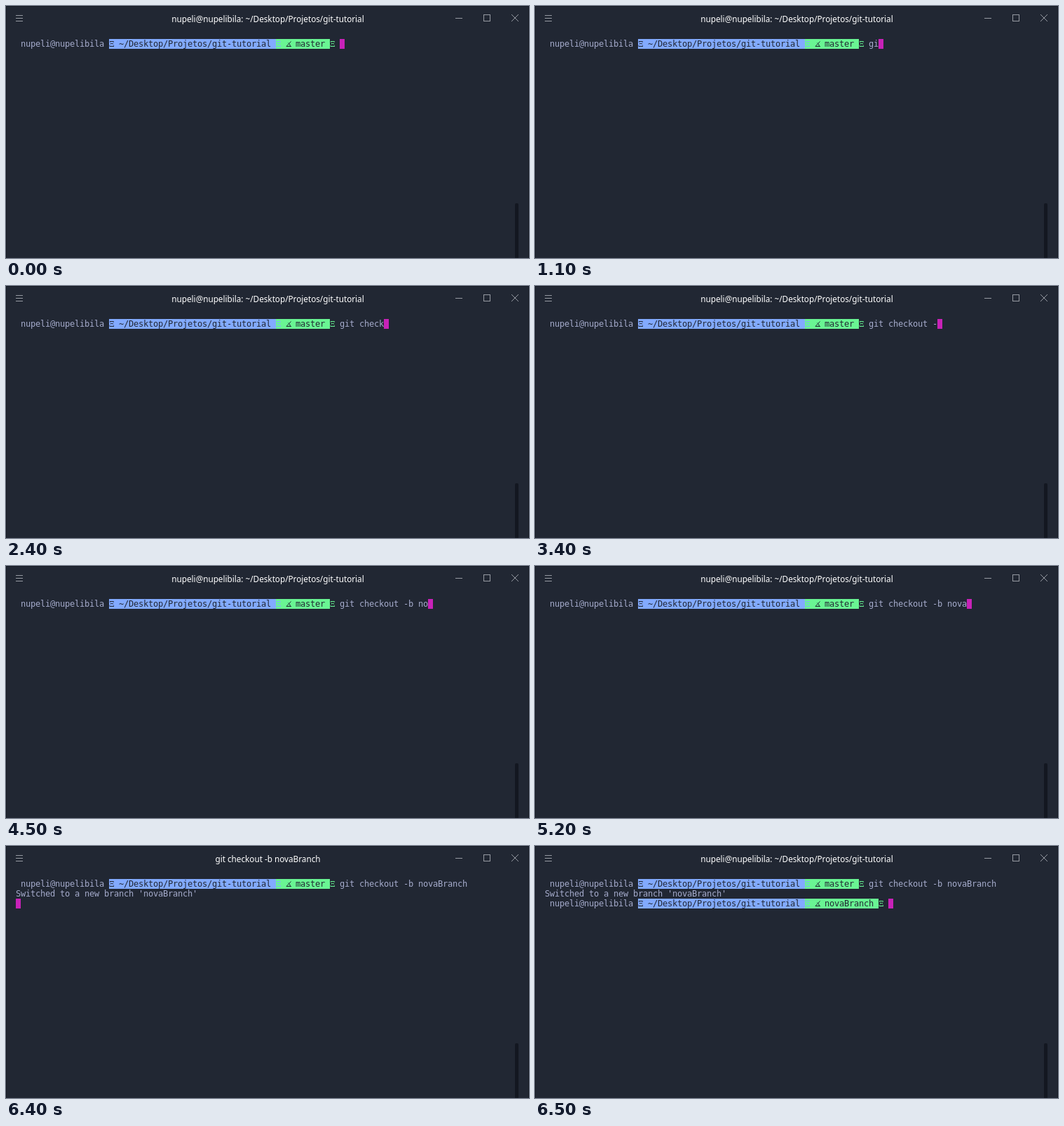
An HTML page with a canvas for the animation above (8 s loop, 746 by 359 pixels).

```html
<!DOCTYPE html>
<html lang="pt">
<head>
<meta charset="utf-8">
<title>Terminal</title>
<style>
  html, body { margin: 0; width: 100%; height: 100%; overflow: hidden; background: #212733; }
  canvas { display: block; }
</style>
</head>
<body>
<canvas id="stage" width="746" height="359"></canvas>
<script>
const ctx = document.getElementById('stage').getContext('2d');
const LOOP = 8000, CELL = 7, ROW = 14, LEFT = 14, TOP = 47;
const color = {
  back: '#212733', text: '#a6accd', blue: '#82aaff', green: '#69f593',
  cursor: '#c822b8', icon: '#969aa2', edge: '#151a24', bar: '#131721'
};
const mono = '12px "DejaVu Sans Mono", monospace';
const serif = '12px "Liberation Serif", serif';
const user = 'nupeli@nupelibila';
const path = '~/Desktop/Projetos/git-tutorial';
const branch = 'novaBranch';
const command = 'git checkout -b ' + branch;
// Moment at which each character of the command appears
const keyTimes = [
  1100, 1100, 1300, 1500, 1600, 1800, 2000, 2300, 2400, 2700, 2900, 3000, 3100,
  3400, 4000, 4100, 4400, 4500, 5000, 5200, 5400, 5600, 5800, 5900, 6000, 6200
];
const outputTime = 6400, promptTime = 6500;

const cellX = col => LEFT + col * CELL;
const cellY = row => TOP + row * ROW;

function rect(x, y, w, h, fill) {
  ctx.fillStyle = fill;
  ctx.fillRect(x, y, w, h);
}

// Writes text on the terminal grid and returns the next free column
function write(text, col, row, fill = color.text, back) {
  if (back) rect(cellX(col), cellY(row), text.length * CELL, ROW, back);
  ctx.textAlign = 'left';
  ctx.fillStyle = fill;
  [...text].forEach((char, i) => {
    ctx.font = char === 'Ξ' ? serif : mono;
    ctx.fillText(char, cellX(col + i), cellY(row) + 11);
  });
  return col + text.length;
}

function branchIcon(col, row) {
  const x = cellX(col), y = cellY(row);
  ctx.strokeStyle = color.back;
  ctx.lineWidth = 1;
  ctx.beginPath();
  ctx.moveTo(x + 8, y + 10.5);
  ctx.lineTo(x + 1, y + 10.5);
  ctx.lineTo(x + 7.5, y + 3.5);
  ctx.moveTo(x + 3.5, y + 5.5);
  ctx.quadraticCurveTo(x + 6.5, y + 7, x + 6.5, y + 11);
  ctx.stroke();
}

function prompt(row, name) {
  const pathCol = write(user + ' ', 1, row);
  const branchCol = write(`Ξ ${path} `, pathCol, row, color.back, color.blue);
  const end = write(`    ${name} `, branchCol, row, color.back, color.green);
  write('Ξ', branchCol, row, color.blue);
  branchIcon(branchCol + 2, row);
  return write('Ξ ', end, row, color.green);
}

function cursor(col, row) {
  rect(cellX(col), cellY(row), CELL, ROW, color.cursor);
}

function windowFrame(title) {
  rect(0, 0, 746, 359, color.back);
  rect(0, 0, 746, 1, color.edge);
  rect(0, 0, 1, 359, color.edge);
  rect(745, 0, 1, 359, color.edge);

  ctx.font = '11.73px "Noto Sans", sans-serif';
  ctx.textAlign = 'center';
  ctx.fillStyle = '#fff';
  ctx.fillText(title, 373.5, 23);

  for (const y of [13, 17, 21]) rect(14, y, 10, 1, color.icon);
  rect(641, 17, 10, 1, color.icon);
  ctx.strokeStyle = color.icon;
  ctx.lineWidth = 1;
  ctx.strokeRect(681.5, 12.5, 9, 9);
  ctx.beginPath();
  ctx.moveTo(721, 12);
  ctx.lineTo(731, 22);
  ctx.moveTo(731, 12);
  ctx.lineTo(721, 22);
  ctx.stroke();

  ctx.fillStyle = color.bar;
  ctx.beginPath();
  ctx.roundRect(726, 281, 5, 82, 2);
  ctx.fill();
}

function draw(time) {
  const running = time >= outputTime && time < promptTime;
  windowFrame(running ? command : `${user}: ${path}`);

  const typed = keyTimes.filter(t => t <= time).length;
  const end = write(command.slice(0, typed), prompt(0, 'master'), 0);
  if (time < outputTime) {
    cursor(end, 0);
  } else {
    write(`Switched to a new branch '${branch}'`, 0, 1);
    cursor(running ? 0 : prompt(2, branch), 2);
  }
}

const start = performance.now();
function tick() {
  draw((performance.now() - start) % LOOP);
  requestAnimationFrame(tick);
}
tick();
</script>
</body>
</html>
```
